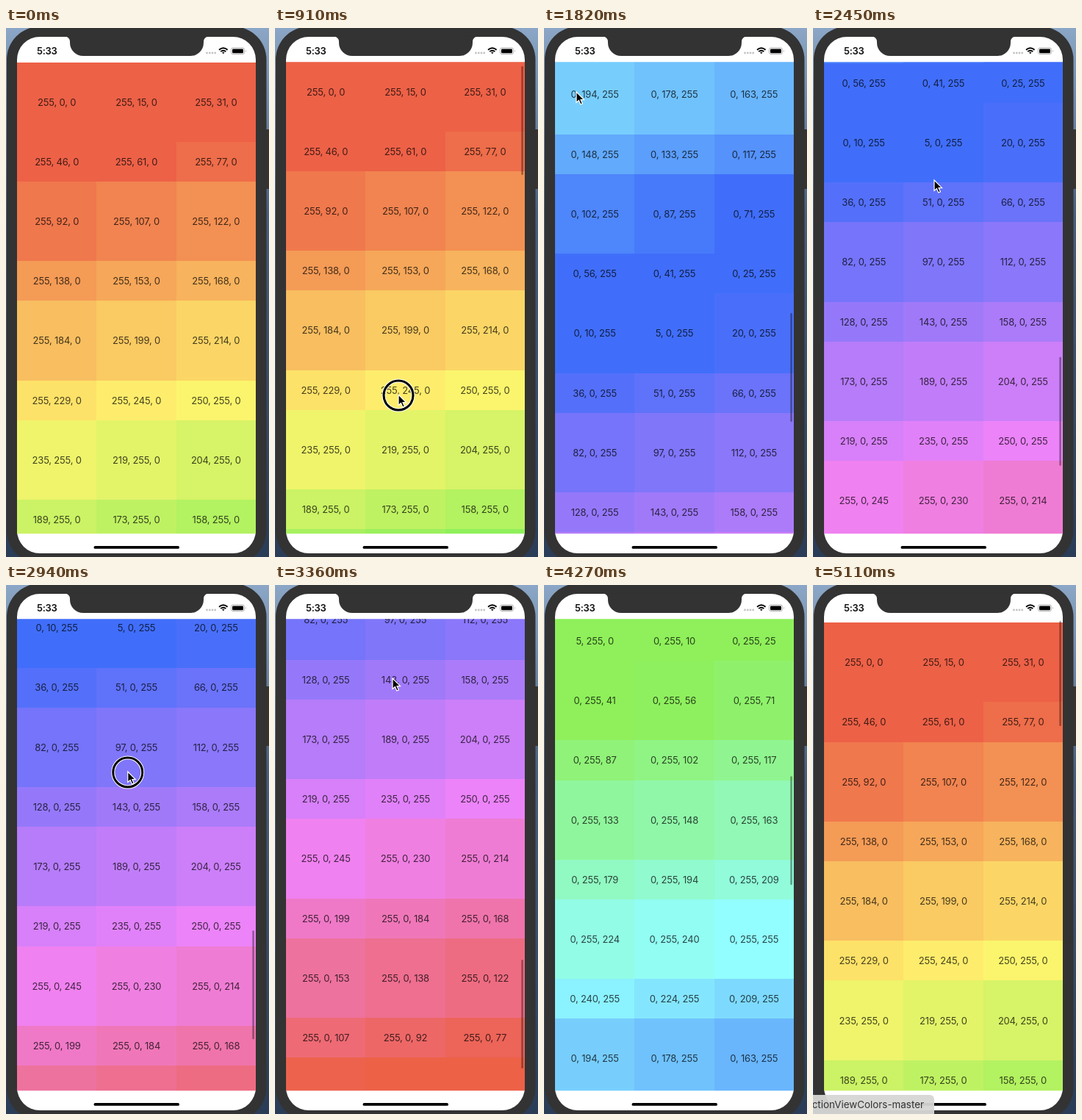
An HTML page that plays this animation: 358 by 720 pixels, repeating every 5.18 s.

```html
<!DOCTYPE html>
<html lang="en">
<head>
<meta charset="utf-8">
<title>Color grid</title>
<style>
html, body { margin: 0; width: 100%; height: 100%; overflow: hidden; background: #333; }
svg { display: block; width: 100%; height: 100%; }
text { font-family: Inter, Roboto, sans-serif; }
#cells text { font-size: 13px; letter-spacing: -.2px; text-anchor: middle; fill-opacity: .72; }
#cells rect { shape-rendering: crispEdges; }
</style>
</head>
<body>
<svg viewBox="0 0 358 720">
  <defs>
    <linearGradient id="desk" x2="0" y2="1">
      <stop offset="0" stop-color="#8ba6c6"/>
      <stop offset=".35" stop-color="#4a5f7c"/>
      <stop offset="1" stop-color="#2a3c56"/>
    </linearGradient>
    <clipPath id="view"><rect x="15" y="46.300" width="325" height="642"/></clipPath>
  </defs>
  <rect width="358" height="720" fill="url(#desk)"/>
  <rect x="354" y="138" width="4" height="81" fill="#38332f"/>
  <rect x="1" y="-2" width="353.500" height="731" rx="45" fill="#333"/>
  <rect x="15" y="12" width="325" height="703" rx="31" fill="#fff"/>
  <path d="M80 11.500a7 7 0 0 1 7 7v1.500a18 18 0 0 0 18 18h146a18 18 0 0 0 18-18v-1.500a7 7 0 0 1 7-7z" fill="#333"/>

  <text x="42" y="36" font-size="13" font-weight="600" letter-spacing="-.3" fill="#111">5:33</text>
  <g fill="#c4c4c4">
    <circle cx="273.500" cy="34" r="1.400"/><circle cx="277.300" cy="34" r="1.400"/>
    <circle cx="281" cy="34" r="1.400"/><circle cx="284.700" cy="34" r="1.400"/>
  </g>
  <g fill="none" stroke="#000" stroke-width="1.900">
    <path d="M290 29.700q5.800-4.800 11.600 0M292.200 32.100q3.600-2.900 7.200 0"/>
    <path d="M294 33.300q1.800-1.300 3.600 0l-1.800 2z" fill="#000" stroke="none"/>
  </g>
  <rect x="306.500" y="27" width="18" height="8.600" rx="2.400" fill="none" stroke="#aaa" stroke-width=".9"/>
  <rect x="308" y="28.400" width="15" height="5.800" rx="1.300"/>
  <path d="M326 29.700q1.500 1.600 0 3.200z" fill="#999"/>

  <g clip-path="url(#view)"><g id="cells"></g></g>
  <rect id="bar" x="335.300" width="2.600" rx="1.300" fill-opacity=".36"/>
  <rect x="119.500" y="705" width="116.500" height="3.800" rx="1.900"/>

  <g id="tip">
    <rect x="-20" y="694" width="185" height="34" rx="6" fill="#d6d6d5" fill-opacity=".95"/>
    <text x="151" y="712" font-size="13.400" text-anchor="end" fill="#333">CollectionViewColors-master</text>
  </g>
  <g id="cursor">
    <g id="ring" fill="none">
      <circle r="20" cy="1" stroke="#fff" stroke-width="5"/>
      <circle r="20" cy="1" stroke="#000" stroke-width="3"/>
    </g>
    <path d="M0 0V14.500L3.400 11.500L5.800 17L8.400 15.900L6 10.600H10.500Z" stroke="#fff" stroke-width="1.200"/>
  </g>
</svg>
<script>
const LOOP = 5180, STEP = 70;
const TOP = 46.5, LEFT = 15, COL = 325 / 3, TALL = 108.3, SHORT = 54.13;
const $ = id => document.getElementById(id);
const lerp = (a, b, u) => a + (b - a) * u;

// Displayed tones of red, green, blue and of yellow, cyan, magenta
const PRIMARY = [[237, 97, 71], [143, 240, 91], [64, 110, 250]];
const SECONDARY = [[255, 245, 110], [146, 254, 255], [240, 131, 249]];
// Share of each hue sector that stays at its primary
const FLAT = [.24, .44, .2, .28, .03, .22];

// Cursor: time, x, y
const PATH = [
  [560, 215, 740], [910, 168, 499], [1100, 160, 207], [1820, 44, 87], [2450, 165, 207],
  [2870, 167, 293], [3150, 162, 137], [3360, 160, 127], [3920, 164, 120], [4270, 120, 745]
];
const DRAGS = [[840, 1100], [2870, 3150], [3920, 4060]];

function cell(i) {
  const h = i / 100 * 6, sector = Math.floor(h);
  const up = h - sector, down = 1 - up;
  const rgb = [[1, up, 0], [down, 1, 0], [0, 1, up], [0, down, 1], [up, 0, 1], [1, 0, down]][sector];
  const flat = FLAT[sector];
  const mix = Math.max(0, ((sector % 2 ? down : up) - flat) / (1 - flat));
  const from = PRIMARY[Math.ceil(sector / 2) % 3], to = SECONDARY[Math.floor(sector / 2)];
  return {
    label: rgb.map(v => Math.round(v * 255)).join(', '),
    fill: from.map((v, k) => Math.round(lerp(v, to[k], mix)))
  };
}

function buildCells() {
  let out = '';
  for (let i = 0; i < 100; i++) {
    const row = Math.floor(i / 3), x = LEFT + i % 3 * COL;
    const y = TOP + Math.floor(row / 2) * (TALL + SHORT) + row % 2 * TALL;
    const h = row % 2 ? SHORT : TALL;
    const { label, fill } = cell(i);
    out += `<rect x="${x}" y="${y}" width="${COL}" height="${h}" fill="rgb(${fill})"/>` +
      `<text x="${x + COL / 2}" y="${y + h / 2 + 4.9}">${label}</text>`;
  }
  $('cells').innerHTML = out;
}

// Scroll view physics: drags, exponential coasting, damped bounce
const coast = (from, to, dt) => to + (from - to) * Math.exp(-dt / 500);

function scrollAt(t) {
  if (t < 840) return 0;
  if (t < 1100) return 306 * ((t - 840) / 260) ** 2.35;
  if (t < 2870) return coast(306, 1834, t - 1100);
  if (t < 3150) return lerp(1790, 1946, (t - 2870) / 280);
  if (t < 3920) return coast(1946, 2110, t - 3150);
  if (t < 4060) return 2075 - 241 * ((t - 3920) / 140) ** 3;
  if (t < 4640) return coast(1834, -837, t - 4060);
  const dt = t - 4640;
  return -1.675 * dt * Math.exp(-.0109 * dt);
}

function cursorAt(t) {
  const n = PATH.findIndex(p => p[0] > t);
  const [a, b] = n > 0 ? [PATH[n - 1], PATH[n]] : [PATH[0], PATH[0]];
  const u = (t - a[0]) / (b[0] - a[0] || 1);
  return [lerp(a[1], b[1], u), lerp(a[2], b[2], u)];
}

const show = (id, on) => $(id).setAttribute('visibility', on ? 'visible' : 'hidden');

function draw(t) {
  const s = scrollAt(t);
  $('cells').setAttribute('transform', `translate(0 ${-s.toFixed(2)})`);
  $('bar').setAttribute('y', 48.8 + .2304 * Math.max(0, s));
  $('bar').setAttribute('height', 148 + Math.min(0, s));
  show('bar', t >= 840);
  $('cursor').setAttribute('transform', `translate(${cursorAt(t)})`);
  show('cursor', t >= 560 && t < 4270);
  show('ring', DRAGS.some(([from, to]) => t >= from && t < to));
  show('tip', t >= 4900);
}

const start = performance.now();
function tick() {
  const t = Math.max(0, performance.now() - start) % LOOP;
  draw(Math.floor(t / STEP) * STEP);
  requestAnimationFrame(tick);
}
buildCells();
tick();
</script>
</body>
</html>
```
